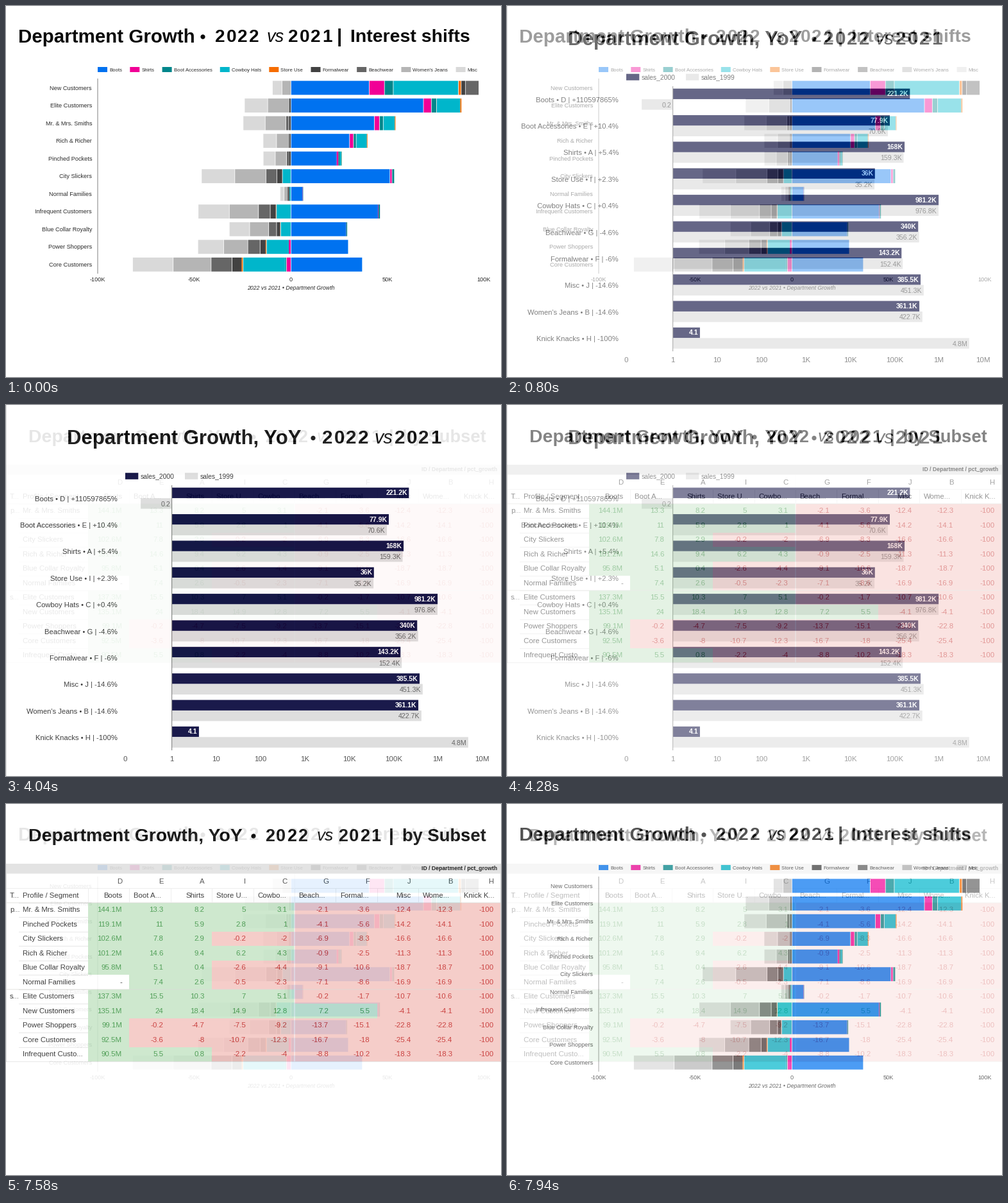
These frames come from a looping animation (772 px wide and 578 px high, 8000 ms). A matplotlib script:

```python
import math

import matplotlib.pyplot as plt
import numpy as np
from matplotlib.animation import FuncAnimation
from matplotlib.patches import Circle, Rectangle

W, H, DPI = 772, 578, 100
INTERVAL, LOOP = 20, 8000
FADE_STEP, FADE_COUNT = 60, 10
FADES = [(500, 0, 1), (4040, 1, 2), (7580, 2, 0)]  # start ms, from, to

# letter: name (~ marks where narrow columns cut it), new sales, growth in %
DEPARTMENTS = {
    "D": ("Boots", 221195.93, 110597865),
    "E": ("Boot A~ccessories", 77.9e3, 10.4),
    "A": ("Shirts", 167.97e3, 5.42),
    "I": ("Store U~se", 36e3, 2.3),
    "C": ("Cowbo~y Hats", 981.2e3, 0.449),
    "G": ("Beach~wear", 340e3, -4.56),
    "F": ("Formal~wear", 143.2e3, -6.04),
    "J": ("Misc", 385.5e3, -14.58),
    "B": ("Wome~n's Jeans", 361.1e3, -14.57),
    "H": ("Knick K~nacks", 4.1, -99.9999146),
}
# name, boots sold now (thousands), boots sold before (cents),
# share of all other sales, lift over the average growth in %
PROFILES = [
    ("Mr. & Mrs. Smiths", 43.23, 3, 0.205, 2.6),
    ("Pinched Pockets", 23.82, 2, 0.098, 0.5),
    ("City Slickers", 51.3, 5, 0.23, -2.4),
    ("Rich & Richer", 30.36, 3, 0.136, 3.8),
    ("Blue Collar Royalty", 28.74, 3, 0.125, -4.8),
    ("Normal Families", 6.2, 0, 0.027, -2.7),
]
SEGMENTS = [
    ("Elite Customers", 68.65, 5, 0.25, 4.6),
    ("New Customers", 40.53, 3, 0.27, 12.3),
    ("Power Shoppers", 29.73, 3, 0.13, -9.6),
    ("Core Customers", 37.0, 4, 0.183, -12.7),
    ("Infrequent Custo~mers", 45.25, 5, 0.195, -4.4),
]
SERIES = dict(zip("DAECIFGBJ", (
    "#0072f0", "#f10096", "#00868b", "#00b6cb", "#f66d00",
    "#424242", "#666666", "#b5b5b5", "#d9d9d9")))
NAVY, SILVER = "#000137", "#dadada"

plt.rcParams["font.family"] = "Liberation Sans"
fig = plt.figure(figsize=(W / DPI, H / DPI), dpi=DPI, facecolor="white")
ax = fig.add_axes([0, 0, 1, 1])


def full(name):
    return name.replace("~", "")


def cut(name):
    return name.split("~")[0] + "..." if "~" in name else name


def short(value):
    for unit, suffix in ((1e6, "M"), (1e3, "K")):
        if value >= unit:
            return f"{round(value / unit, 1):g}{suffix}"
    return f"{round(value, 1):g}"


def before(letter):
    _, now, growth = DEPARTMENTS[letter]
    return now / (1 + growth / 100)


def group_growth(letter, lift):
    """Growth in % of one department within one customer group."""
    return (1 + DEPARTMENTS[letter][2] / 100) * (100 + lift) - 100


def shifts(group):
    """Change per series, in thousands, for one customer group."""
    _, boots, _, share, lift = group
    return [boots if letter == "D" else
            before(letter) * share * group_growth(letter, lift) / 1e5
            for letter in SERIES]


def text(x, y, s, size, color="#2b2b2b", ha="left", **kw):
    """Place text with the middle of its capitals at y; size in pixels."""
    return ax.text(x, y + 0.344 * size, s, fontsize=size * 72 / DPI, color=color,
                   ha=ha, va="baseline", **kw)


def rect(x0, y0, x1, y1, color, snap=False):
    ax.add_patch(Rectangle((x0, y0), x1 - x0, y1 - y0, fc=color, lw=0, snap=snap))


def title(y, size, x, heading, dot, years, versus, bar=None, tail=""):
    """Heading, bullet, two spaced-out years around an italic vs, then a tail."""
    ink = "#0a0a0a"
    text(x, y, heading, size, ink, weight="bold")
    ax.add_patch(Circle((dot, y + 1.5), 3.6, fc=ink, lw=0))
    for start, year in zip(years, ("2022", "2021")):
        for i, digit in enumerate(year):
            text(start + 0.6 * size * i, y, digit, 0.95 * size, ink, weight="bold")
    text(versus, y, "vs", size * 0.92, ink, style="italic")
    if tail:
        text(bar, y, "|", size, ink, weight="bold")
        text(bar + 21, y, tail, size * 0.965, ink, weight="bold")


def shifts_chart():
    zero, scale = 444, 3.01
    title(46.5, 29.5, 19, "Department Growth", 307, (326, 440), 407, 516, "Interest shifts")
    x = 143
    for letter, color in SERIES.items():
        rect(x, 95, x + 15, 103, color)
        label = text(x + 18, 99, full(DEPARTMENTS[letter][0]), 7.8)
        x += 30.3 + label.get_window_extent().width

    groups = sorted(PROFILES + SEGMENTS, key=lambda group: -sum(shifts(group)))
    for row, group in enumerate(groups):
        y = 127.5 + 27.53 * row
        text(134, y, full(group[0]), 9.2, ha="right")
        ends = {1: zero, -1: zero}
        for value, color in zip(shifts(group), SERIES.values()):
            side = 1 if value > 0 else -1
            start = ends[side]
            ends[side] = end = start + value * scale
            gap = 0.8 if abs(end - start) > 3 else 0
            rect(min(start, end) + gap, y - 10.9, max(start, end), y + 10.9, color)
    rect(142.5, 113, 143.5, 417, "#808080")
    for k in range(-100, 101, 50):
        text(zero + k * scale, 426, f"{k}K" if k else "0", 9.1, ha="center")
    text(zero, 439, "2022 vs 2021 • Department Growth", 8.8, ha="center", style="italic")


def sales_chart():
    one, decade = 258.5, 69.2
    rect(0, 0, 1, H, "#dcdcdc")
    title(50, 31.2, 95, "Department Growth, YoY", 479, (493, 606), 574)
    for x, color, name in ((186, NAVY, "sales_2000"), (279, SILVER, "sales_1999")):
        rect(x, 105.7, x + 20.3, 115.8, color)
        text(x + 24, 111, name, 10.2)
    for row, (letter, (name, now, growth)) in enumerate(DEPARTMENTS.items()):
        top = 128.7 + 41.35 * row
        label = f"{full(name)} • {letter} | {round(growth, 1):+.10g}%"
        text(174, top + 17.2, label, 11.2, ha="right")
        for value, y, color in ((now, top, NAVY), (before(letter), top + 16.5, SILVER)):
            end = one + decade * math.log10(value)
            rect(min(one, end), y, max(one, end), y + 16.4, color)
            right = max(one, end) - 2.5
            if color == NAVY:
                text(right, y + 8, short(value), 10.4, "white", "right", weight="bold")
            else:
                text(right, y + 8.7, short(value), 10.6, "#555555", "right")
    rect(258, 125, 259.2, 538, "#808080")
    text(186, 551.5, "0", 11.5, "#444444", "center")
    for power in range(8):
        text(one + decade * power, 551.5, short(10 ** power), 11.5, "#444444", "center")


def table_value(letter, group):
    _, boots, cents, _, lift = group
    if letter == "D":
        return f"{boots / cents * 10:.1f}M" if cents else "-"
    return f"{round(group_growth(letter, lift), 1):g}"


def cell_colors(value):
    if value == "-":
        return "white", "#2b2b2b"
    if value.startswith("-"):
        return "#f4c7c3", "#c5302e"
    return "#c8e6c9", "#3f9546"


def growth_table():
    left, top, width, height = 128, 153.5, 64.4, 22.5
    size, line = 11.4, "#e4e4e4"
    title(48.5, 28.4, 35, "Department Growth, YoY", 386, (404, 518), 485, 597, "by Subset")
    rect(0, 93, W, 108.5, "#e0e0e0")
    text(766, 100.5, "ID / Department / pct_growth", 8.6, "#111111", "right", weight="bold")
    rect(0, 131, W, 132, "#ececec")
    text(6, 142.5, "T...", size)
    text(26, 142.5, "Profile / Segment", size)

    columns = [(letter, left + col * width) for col, letter in enumerate(DEPARTMENTS)]
    for letter, x in columns:
        name = DEPARTMENTS[letter][0]
        rect(x, 132, x + 1, 153, "#ececec", True)
        text(x + 53, 120, letter, size, "#444444", "right")
        if "~" in name:
            text(x + 6.5, 142.5, cut(name), size)
        else:
            text(x + 53, 142.5, name, size, ha="right")

    y = top
    for mark, groups in (("p...", PROFILES), ("s...", SEGMENTS)):
        start = y
        text(6, y + 11, mark, size)
        for group in groups:
            text(26, y + 11, cut(group[0]), size)
            rect(20, y, left, y + 1, line, True)
            for letter, x in columns:
                value = table_value(letter, group)
                fill, ink = cell_colors(value)
                rect(x, y, x + width, y + height, fill, True)
                text(x + 53, y + 11, value, 11.5, ink, "right")
            y += height
        rect(0, start, W, start + 0.8, "#d8d8d4")
    rect(449.5, 109, 450.5, 401, "#fafafa")
    rect(0, 401, W, 402, line)
    for x in (0, W - 1):
        rect(x, 93, x + 1, 402, "#dcdcdc")


def render(paint):
    ax.clear()
    ax.set(xlim=(0, W), ylim=(H, 0))
    ax.axis("off")
    paint()
    fig.canvas.draw()
    return np.array(fig.canvas.buffer_rgba())[..., :3].astype(np.float32)


slides = [render(paint) for paint in (shifts_chart, sales_chart, growth_table)]
ax.clear()
ax.axis("off")
screen = ax.imshow(slides[0].astype(np.uint8), extent=(0, W, H, 0),
                   aspect="auto", interpolation="nearest")


def update(index):
    now = index * INTERVAL
    picture = slides[0]
    for start, old, new in FADES:
        if now >= start:
            mix = min((now - start) // FADE_STEP + 1, FADE_COUNT) / FADE_COUNT
            picture = slides[old] * (1 - mix) + slides[new] * mix
    screen.set_data(np.rint(picture).astype(np.uint8))
    return [screen]


animation = FuncAnimation(fig, update, frames=LOOP // INTERVAL, interval=INTERVAL,
                          repeat=True, repeat_delay=0)
plt.show()
```
